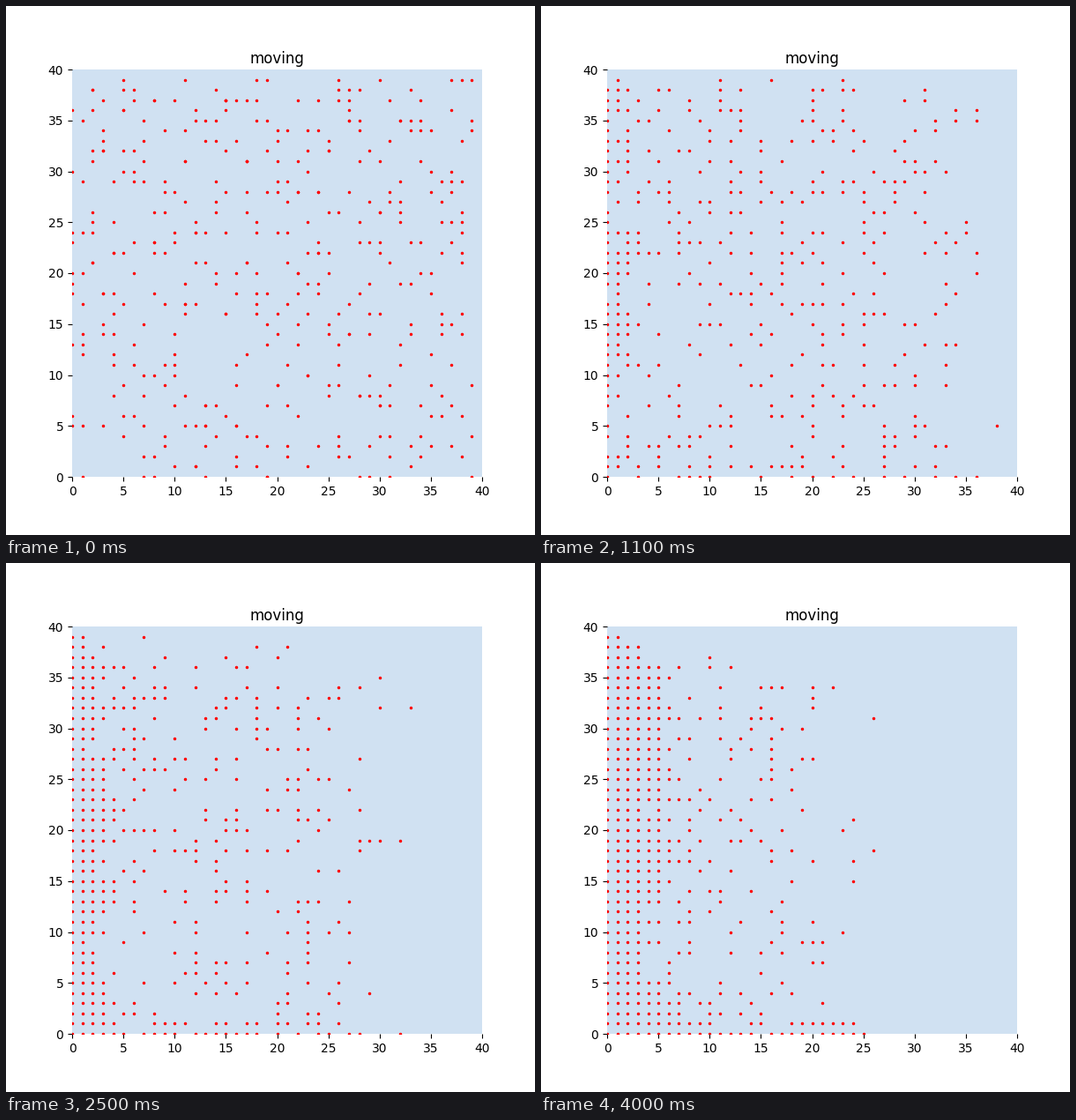
Animation of 600x600 px, one loop 4100 ms. Source, as a matplotlib script:

```python
import matplotlib.pyplot as plt
import numpy as np
from matplotlib.animation import FuncAnimation

SIZE = 40
AGENTS = 400
STEPS = 41
LEFT, DOWN, UP = 0.55, 0.2, 0.06  # chances per step; otherwise wait

# Walkers that start along the right and top edges
RIGHT_EDGE = {
    39: [0, 4, 9, 34, 35, 39],
    38: [2, 6, 14, 16, 21, 22, 24, 25, 26, 29, 33, 39],
    37: [3, 7, 11, 15, 23, 25, 28, 29, 30, 36, 39],
}
TOP_EDGE = [5, 11, 18, 19, 26, 30]


def start(rng):
    edge = [(x, y) for x, ys in RIGHT_EDGE.items() for y in ys]
    edge += [(x, SIZE - 1) for x in TOP_EDGE]
    free = AGENTS - len(edge)
    # Spread the rest evenly over the columns, at random heights
    inner = np.column_stack([np.arange(free) % min(RIGHT_EDGE),
                             rng.integers(0, SIZE - 1, free)])
    return np.vstack([edge, inner])


def step(pos, count, rng):
    """Let every walker try one move in random order; taken cells block."""
    for i in rng.permutation(len(pos)):
        x, y = pos[i]
        r = rng.random()
        if r < LEFT:
            nx, ny = x - 1, y
        elif r < LEFT + DOWN:
            nx, ny = x, y - 1
        elif r < LEFT + DOWN + UP:
            nx, ny = x, y + 1
        else:
            continue
        if nx >= 0 and 0 <= ny < SIZE and count[nx, ny] == 0:
            count[x, y] -= 1
            count[nx, ny] += 1
            pos[i] = nx, ny


def simulate(seed=7):
    rng = np.random.default_rng(seed)
    pos = start(rng)
    count = np.zeros((SIZE, SIZE), int)
    np.add.at(count, (pos[:, 0], pos[:, 1]), 1)
    history = [pos.copy()]
    for _ in range(STEPS - 1):
        step(pos, count, rng)
        history.append(pos.copy())
    return history


history = simulate()

fig, ax = plt.subplots(figsize=(6, 6), dpi=100)
ax.set_facecolor("#d0e1f2")
ax.set_xlim(0, SIZE)
ax.set_ylim(0, SIZE)
ax.set_title("moving", pad=5.3)
for spine in ax.spines.values():
    spine.set_visible(False)
dots, = ax.plot([], [], "r.", markersize=3)


def draw(frame):
    dots.set_data(*history[frame].T)
    return dots,


anim = FuncAnimation(fig, draw, frames=STEPS, init_func=lambda: draw(0),
                     interval=100, repeat=True, repeat_delay=0)
plt.show()
```
